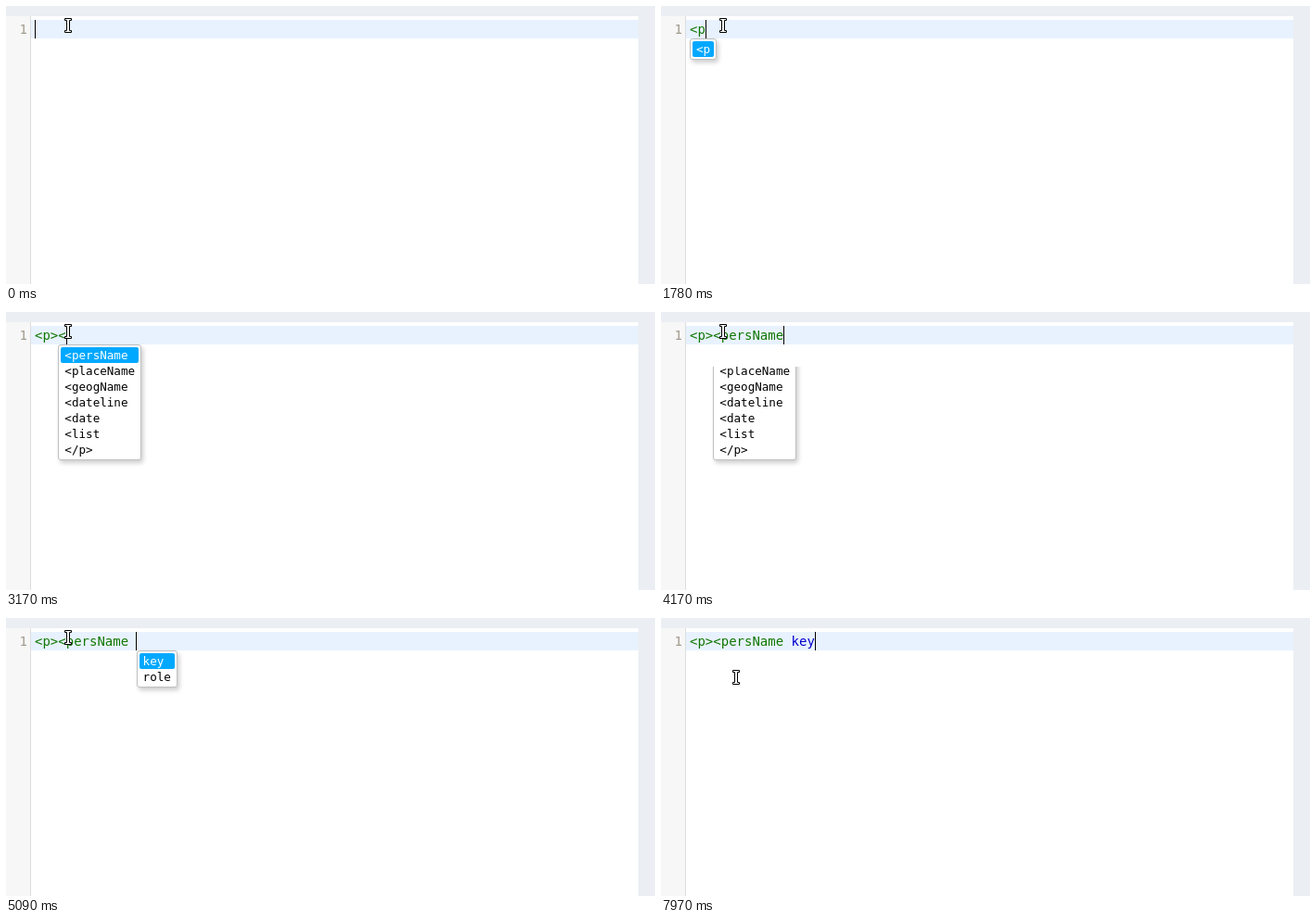
An HTML page for the animation above (8000 ms loop, 700 by 300 pixels).

```html
<!DOCTYPE html>
<html lang="en">
<head>
<meta charset="utf-8">
<title>XML editor with tag completion</title>
<style>
  html, body { margin: 0; width: 100%; height: 100%; overflow: hidden; background: #ebeef3; }
  #stage { position: relative; width: 700px; height: 300px; overflow: hidden;
    font: 14px/20px "DejaVu Sans Mono", monospace; white-space: pre; }
  #stage > * { position: absolute; }
  #editor { left: 0; top: 11px; width: 682px; height: 289px; background: #fff; }
  #gutter { left: 0; top: 11px; width: 26px; height: 289px; background: #f7f7f7; border-right: 1px solid #ddd; }
  #active { left: 27px; top: 15px; width: 655px; height: 20px; background: #e8f2ff; }
  #number { left: 0; top: 15px; width: 23px; text-align: right; color: #a09a8c; }
  #line { left: 31px; top: 15px; color: #170; }
  #attr { color: #00c; }
  #caret { top: 15px; width: 1px; height: 20px; background: #000; }
  #clip { left: 0; top: 0; width: 700px; height: 300px; }
  #hints { position: absolute; top: 35px; padding: 2px; border: 1px solid silver; border-radius: 3px;
    background: #fff; box-shadow: 2px 3px 5px rgba(0, 0, 0, .2); font-size: 12.6px; line-height: 17px; color: #000; }
  #hints div { padding: 0 4px; border-radius: 2px; }
  #hints div:first-child { background: #00a8ff; color: #fff; }
  #mouse { left: 63px; top: 13px; }
</style>
</head>
<body>
<div id="stage">
  <div id="editor"></div>
  <div id="gutter"></div>
  <div id="active"></div>
  <div id="number">1</div>
  <div id="line"><span id="tag"></span><span id="attr"></span></div>
  <div id="caret"></div>
  <div id="clip"><div id="hints"></div></div>
  <svg id="mouse" width="8" height="16" viewBox="0 0 8 16">
    <path d="M.5 .5H7.5V2.5H5.5V13.5H7.5V15.5H.5V13.5H2.5V2.5H.5Z" fill="#fff" stroke="#000"/>
  </svg>
</div>
<script>
const LOOP = 8000;
const $ = id => document.getElementById(id);
const [tag, attr, caret, clip, hints, mouse] =
  ["tag", "attr", "caret", "clip", "hints", "mouse"].map($);

const menus = {
  open: { x: 31, items: ["<p"] },
  child: { x: 56.3, items: ["<persName", "<placeName", "<geogName", "<dateline", "<date", "<list", "</p>"] },
  attrs: { x: 140.6, items: ["key", "role"] }
};

// Each entry changes only the listed properties. cut: top edge of the visible menu part.
const steps = [
  [0, { tag: "", attr: "", x: 31, on: true, menu: null, cut: 0, mx: 0, my: 0 }],
  [820, { on: false }],
  [1370, { tag: "<", x: 39, on: true }],
  [1490, { menu: "open" }],
  [1780, { tag: "<p", x: 48 }],
  [2620, { tag: "<p>", x: 56, cut: 59 }],
  [2680, { menu: null, cut: 0 }],
  [3040, { tag: "<p><", x: 65 }],
  [3170, { menu: "child" }],
  [4010, { on: false }],
  [4170, { tag: "<p><persName", x: 132, on: true, cut: 59 }],
  [4230, { menu: null, cut: 0 }],
  [5030, { tag: "<p><persName ", x: 140 }],
  [5090, { menu: "attrs" }],
  [6010, { on: false }],
  [7000, { on: true }],
  [7100, { attr: "key", x: 166, cut: 59 }],
  [7160, { menu: null, cut: 0 }],
  [7930, { mx: 7, my: 21 }],
  [7970, { mx: 14, my: 43 }]
];

function stateAt(t) {
  const s = {};
  for (const [at, change] of steps) if (at <= t) Object.assign(s, change);
  return s;
}

function showMenu(name) {
  hints.style.display = name ? "block" : "none";
  if (!name) return;
  const { x, items } = menus[name];
  hints.style.left = x + "px";
  hints.replaceChildren(...items.map(text => {
    const row = document.createElement("div");
    row.textContent = text;
    return row;
  }));
}

let shown;
function render(t) {
  const s = stateAt(t);
  const key = JSON.stringify(s);
  if (key === shown) return;
  shown = key;
  tag.textContent = s.tag;
  attr.textContent = s.attr;
  caret.style.left = s.x + "px";
  caret.style.visibility = s.on ? "visible" : "hidden";
  clip.style.clipPath = `inset(${s.cut}px 0 0 0)`;
  showMenu(s.menu);
  mouse.style.transform = `translate(${s.mx}px, ${s.my}px)`;
}

const start = performance.now();
function tick() {
  render((performance.now() - start) % LOOP);
  requestAnimationFrame(tick);
}
tick();
</script>
</body>
</html>
```
